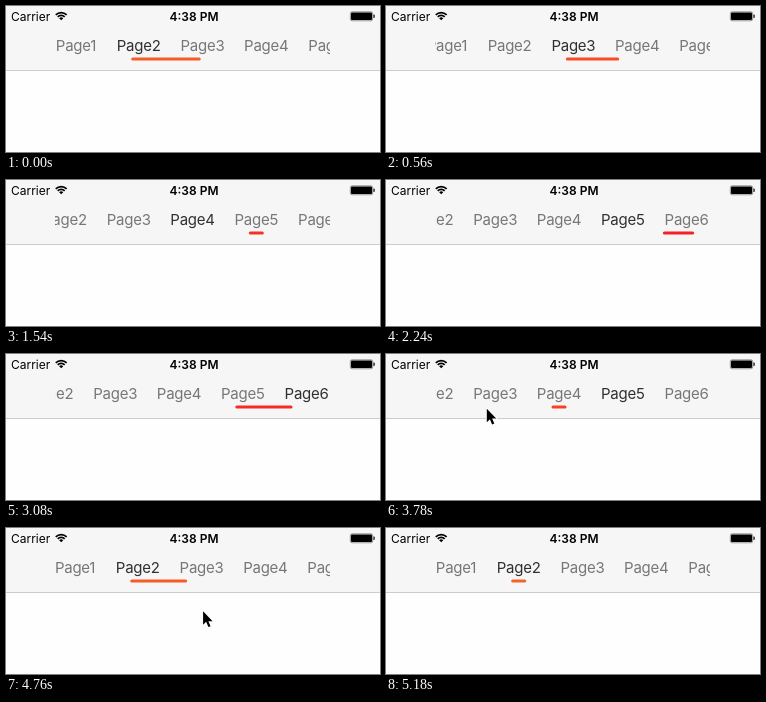
An HTML page with a canvas for the animation above (5.46 s loop, 374x146 px).

```html
<!DOCTYPE html>
<html lang="en">
<head>
<meta charset="utf-8">
<title>Paged tab bar</title>
<style>
  html, body { margin: 0; width: 100%; height: 100%; overflow: hidden; background: #fefefe; }
  canvas { display: block; width: 374px; height: 146px; }
</style>
</head>
<body>
<canvas id="stage"></canvas>
<script>
const W = 374, H = 146, LOOP = 5460, STEP = 70;
const canvas = document.getElementById('stage');
const ctx = canvas.getContext('2d');
const ratio = window.devicePixelRatio || 1;
canvas.width = W * ratio;
canvas.height = H * ratio;
ctx.scale(ratio, ratio);

const FONT = 'Inter, Roboto, sans-serif';
const VIEW = { left: 49, right: 324 };
const MAX_SCROLL = 87.3;
const SCROLL_TIME = 300;
const BAR_HALF = 7.5;

// Pager motion: start, end, from page, to page (zero-based)
const swipes = [
  [-165, 335, 1, 2], [430, 930, 2, 3], [1060, 1540, 3, 4], [1850, 2467, 4, 5],
  [2840, 3350, 5, 4], [3380, 3800, 4, 3], [4480, 4950, 3, 1]
];
// Selected tab: time, page
const selections = [
  [-400, 1], [315, 2], [935, 3], [1575, 4], [2400, 5], [3325, 4], [3885, 3], [4480, 1]
];
// Pointer: time, x, y
const pointer = [
  [3640, 140, 120], [3710, 115, 80], [3780, 100, 54], [3920, 92, 50],
  [4200, 78, 38], [4480, 78, 38], [4970, 285, 116], [5180, 335, 148]
];

const clamp = (v, lo, hi) => Math.min(hi, Math.max(lo, v));
const mix = (a, b, u) => a + (b - a) * u;
const smooth = u => u * u * (3 - 2 * u);
const swipeEase = u => smooth(1 - Math.pow(1 - u, 1.5));
const tabCenter = page => page === 0 ? 70 : 132.7 + 63.8 * (page - 1);
const scrollFor = page =>
  clamp(tabCenter(page) - (VIEW.left + VIEW.right) / 2, 0, MAX_SCROLL);

function pageAt(t) {
  const [start, end, from, to] = swipes.filter(s => s[0] <= t).pop();
  return mix(from, to, swipeEase(clamp((t - start) / (end - start), 0, 1)));
}

function selectionAt(t) {
  const past = selections.filter(s => s[0] <= t);
  const [time, page] = past.pop();
  const previous = past.length ? past.pop()[1] : page;
  const u = clamp((t - time) / SCROLL_TIME, 0, 1);
  return { page, scroll: mix(scrollFor(previous), scrollFor(page), smooth(u)) };
}

function text(str, x, y, font, color, align, spacing = '0px') {
  ctx.font = `${font} ${FONT}`;
  ctx.fillStyle = color;
  ctx.textAlign = align;
  ctx.letterSpacing = spacing;
  ctx.fillText(str, x, y);
}

function roundRect(x, y, w, h, r, color) {
  ctx.fillStyle = color;
  ctx.beginPath();
  ctx.roundRect(x, y, w, h, r);
  ctx.fill();
}

function drawWifi(x, y) {
  const a = Math.PI * 0.25;
  ctx.strokeStyle = ctx.fillStyle = '#000';
  ctx.lineWidth = 1.7;
  for (const r of [7.7, 4.9]) {
    ctx.beginPath();
    ctx.arc(x, y, r, -Math.PI / 2 - a, -Math.PI / 2 + a);
    ctx.stroke();
  }
  ctx.beginPath();
  ctx.moveTo(x, y);
  ctx.arc(x, y, 2.9, -Math.PI / 2 - a, -Math.PI / 2 + a);
  ctx.fill();
}

function drawBattery() {
  ctx.strokeStyle = '#555';
  ctx.lineWidth = 0.6;
  ctx.beginPath();
  ctx.roundRect(344.3, 5.8, 22.4, 9, 1.8);
  ctx.stroke();
  roundRect(345, 6.5, 21, 7.6, 1, '#000');
  roundRect(367.4, 8.6, 1.4, 3.4, [0, 1, 1, 0], '#222');
}

function drawChrome() {
  ctx.fillStyle = '#fefefe';
  ctx.fillRect(0, 0, W, H);
  ctx.fillStyle = '#f6f6f6';
  ctx.fillRect(0, 0, W, 64);
  ctx.fillStyle = '#cdcdcd';
  ctx.fillRect(0, 64, W, 1);
  text('Carrier', 5, 14.5, '400 12px', '#000', 'left');
  text('4:38 PM', 188, 14.5, '600 12px', '#000', 'center');
  drawWifi(55.2, 14.3);
  drawBattery();
}

// One end of the bar leads over the first half, the other follows
function drawBar(page) {
  const base = Math.floor(page), f = page - base;
  const from = tabCenter(base), to = tabCenter(base + 1);
  const left = mix(from, to, Math.max(0, 2 * f - 1)) - BAR_HALF;
  const right = mix(from, to, Math.min(1, 2 * f)) + BAR_HALF;
  const green = Math.round(116 - 17 * page);
  roundRect(left, 51.5, right - left, 3, 1.5, `rgb(246,${green},38)`);
}

function drawTabs(t) {
  const { page, scroll } = selectionAt(t);
  ctx.save();
  ctx.beginPath();
  ctx.rect(VIEW.left, 25, VIEW.right - VIEW.left, 38);
  ctx.clip();
  ctx.translate(-scroll, 0);
  for (let i = 0; i < 6; i++) {
    text(`Page${i + 1}`, tabCenter(i), 45, '400 15px',
      i === page ? '#303030' : '#777', 'center', '-0.25px');
  }
  drawBar(pageAt(t));
  ctx.restore();
}

function drawPointer(t) {
  const next = pointer.findIndex(p => p[0] > t);
  if (next < 1) return;
  const [t0, x0, y0] = pointer[next - 1], [t1, x1, y1] = pointer[next];
  const u = (t - t0) / (t1 - t0);
  ctx.save();
  ctx.translate(mix(x0, x1, u), mix(y0, y1, u));
  const arrow = new Path2D('M.8 .8V14.2L3.9 11.3L6.1 16.5L8.3 15.6L6.1 10.6H10.3Z');
  ctx.lineJoin = 'round';
  ctx.lineWidth = 1.8;
  ctx.strokeStyle = '#fff';
  ctx.stroke(arrow);
  ctx.fillStyle = '#000';
  ctx.fill(arrow);
  ctx.restore();
}

function render() {
  const t = Math.floor((performance.now() % LOOP) / STEP) * STEP;
  drawChrome();
  drawTabs(t);
  drawPointer(t);
  requestAnimationFrame(render);
}
render();
</script>
</body>
</html>
```
